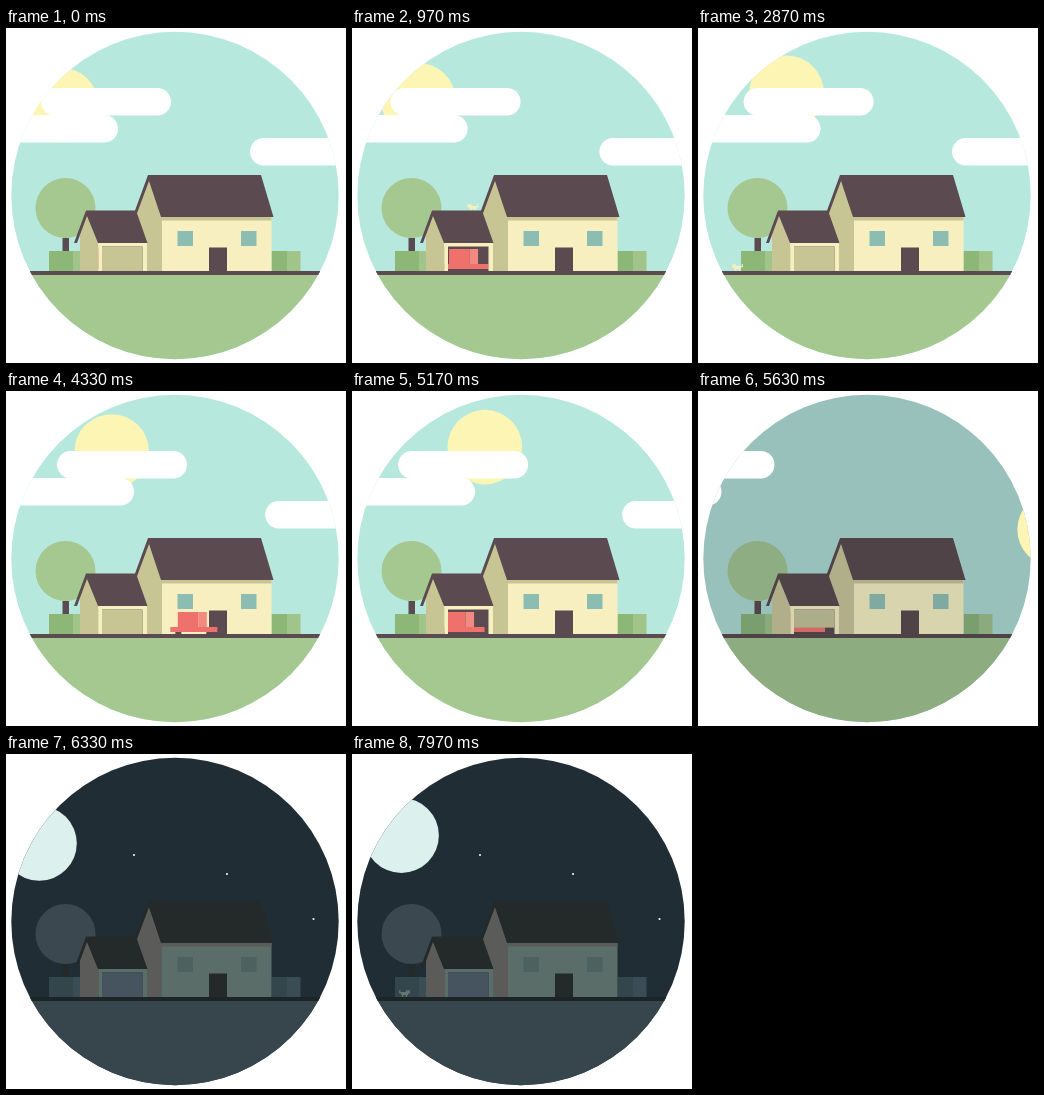
Animation of 340x335 px, one loop 8 s. Source, as an HTML page with a canvas:

```html
<!DOCTYPE html>
<html lang="en">
<head>
<meta charset="utf-8">
<title>House, day to night</title>
<style>
  html, body { margin: 0; width: 100%; height: 100%; overflow: hidden; background: #fff; }
  canvas { display: block; width: 340px; height: 335px; }
</style>
</head>
<body>
<canvas id="stage"></canvas>
<script>
const LOOP = 8000;
const GROUND = 243;
const canvas = document.getElementById('stage');
const ctx = canvas.getContext('2d');
const ratio = window.devicePixelRatio || 1;
canvas.width = 340 * ratio;
canvas.height = 335 * ratio;

// Each colour as [day, night].
const palette = {
  sky: ['#b7e8de', '#212d35'],
  ground: ['#a4c88f', '#37464d'],
  line: ['#5b4a50', '#1d2425'],
  roof: ['#5b4a50', '#242a29'],
  wall: ['#f7efc0', '#5b6d69'],
  side: ['#c8c595', '#5b5c5a'],
  shutter: ['#c8c595', '#46545f'],
  glass: ['#8bbdb2', '#4d615f'],
  tree: ['#a4c88f', '#3c484f'],
  bushDark: ['#8cb777', '#33464c'],
  bushLight: ['#a0c48a', '#3a4d55'],
  car: ['#ee716b', '#6b4a4a'],
  carLight: ['#f28a82', '#75524f'],
  cat: ['#f7efc0', '#647775']
};

const clamp = v => Math.min(1, Math.max(0, v));
const progress = (t, from, to) => clamp((t - from) / (to - from));
const mix = (a, b, p) => a + (b - a) * p;
const channels = hex => [1, 3, 5].map(i => parseInt(hex.slice(i, i + 2), 16));

let night = 0;
function shade(name) {
  const [day, dark] = palette[name].map(channels);
  return `rgb(${day.map((v, i) => Math.round(mix(v, dark[i], night)))})`;
}

function rect(fill, x, y, right, bottom) {
  ctx.fillStyle = fill;
  ctx.fillRect(x, y, right - x, bottom - y);
}

function disc(fill, x, y, r) {
  ctx.fillStyle = fill;
  ctx.beginPath();
  ctx.arc(x, y, r, 0, Math.PI * 2);
  ctx.fill();
}

function poly(fill, ...xy) {
  ctx.fillStyle = fill;
  ctx.beginPath();
  for (let i = 0; i < xy.length; i += 2) ctx.lineTo(xy[i], xy[i + 1]);
  ctx.fill();
}

function cloud(left, right, y) {
  ctx.fillStyle = '#fff';
  ctx.beginPath();
  ctx.roundRect(left, y, right - left, 27.5, 13.7);
  ctx.fill();
}

const orbitY = x => 54.8 + 0.00211 * (x - 157.5) ** 2;

function drawSky(t) {
  rect(shade('sky'), 0, 0, 340, 335);

  ctx.globalAlpha = progress(t, 5900, 6320);
  for (const [x, y] of [[128, 101], [221, 120], [307.5, 165]]) disc('#eef6f5', x, y, 1.1);
  ctx.globalAlpha = 1;

  const rush = Math.max(0, t - 5000) / 630;
  const drift = 0.0037 * t;
  const sunX = 55 + 0.0117 * t + 235 * rush ** 2;
  if (sunX < 400) disc('#fdf5b4', sunX, orbitY(sunX), 37.3);

  if (t > 5700) {
    const rise = 1 - (1 - progress(t, 5700, 6300)) ** 2;
    const moonX = mix(-60, 33, rise) + 0.0098 * Math.max(0, t - 6300);
    disc('#dcf0ee', moonX, orbitY(moonX) + 2, 37.5);
  }

  const sweep = 109 * rush ** 2;
  cloud(35 + drift - sweep, 165 + drift - sweep, 60);
  cloud(-80, 112 + drift - sweep, 87);
  cloud(244 + 0.0035 * t + sweep, 520 + sweep, 110);
}

function drawHouse() {
  const roof = shade('roof');
  poly(shade('side'), 142, 150, 156, 189, 156, GROUND, 130, GROUND, 130, 183);
  rect(shade('wall'), 156, 187, 265.5, GROUND);
  rect(shade('side'), 156, 189, 265.5, 192.5);
  poly(roof, 142, 147, 255, 147, 267.5, 189, 155, 189, 143, 153, 130, 188, 127, 188);
  for (const x of [171.5, 235]) rect(shade('glass'), x, 203, x + 15.5, 218);
  rect(roof, 203, 219.5, 221, GROUND);
}

function carX(t) {
  if (t < 3400) {
    const s = Math.max(0, t - 750);
    const ramp = 400, speed = 0.1564;
    return 80 + speed * (s < ramp ? s * s / (2 * ramp) : s - ramp / 2);
  }
  return 324 - 244 * Math.sin(progress(t, 3400, 5450) * Math.PI / 2);
}

function drawCar(t) {
  const x = carX(t);
  if (x > 330) return;
  rect(shade('car'), x + 7.5, 221, x + 28, 237);
  rect(shade('carLight'), x + 28, 221, x + 36.5, 237);
  rect(shade('car'), x, 236, x + 47, 241);
  for (const dx of [5, 36]) rect(shade('roof'), x + dx, 241, x + dx + 6, 244);
}

function doorOpening(t) {
  return t < 3000
    ? progress(t, 300, 750) - progress(t, 1200, 1650)
    : progress(t, 4350, 4750) - progress(t, 5350, 5730);
}

function drawGarage(t) {
  const wall = shade('wall');
  poly(shade('side'), 80.5, 186, 92.5, 215, 92.5, GROUND, 74, GROUND, 74, 205);
  rect(wall, 92.5, 213, 141, 218.5);
  rect(wall, 92.5, 213, 96, GROUND);
  rect(wall, 136.5, 213, 141, GROUND);
  rect(shade('shutter'), 96, 218.5, 136.5, mix(GROUND, 218.5, doorOpening(t)));
  poly(shade('roof'), 80, 182.5, 130, 182.5, 141.5, 215, 92, 215, 81, 188, 71, 215, 68, 215);
}

function drawPlants() {
  disc(shade('tree'), 59.5, 180, 30);
  rect(shade('roof'), 56.5, 210, 63, 224);
  rect(shade('bushDark'), 43, 223, 67, GROUND);
  rect(shade('bushLight'), 67, 223, 81, GROUND);
  rect(shade('bushDark'), 265.5, 223, 281, GROUND);
  rect(shade('bushLight'), 281, 223, 294.5, GROUND);
}

function drawCat(x, y, facing, t) {
  const fill = shade('cat');
  const step = Math.sin(t / 45) * 0.7;
  ctx.save();
  ctx.translate(x + 5.5, y);
  ctx.scale(facing, 1);
  poly(fill, 1.5, -7.5, 2.5, -6.6, 4, -6.6, 5, -7.5, 5.5, -3.5, 1.5, -3.5);
  rect(fill, -3.5, -5, 3.5, -2);
  rect(fill, -5.3, -7, -4.2, -4);
  rect(fill, -5.3, -4.8, -3, -3.7);
  rect(fill, -3.3 + step, -2.2, -1.9 + step, 0);
  rect(fill, 1.8 - step, -2.2, 3.2 - step, 0);
  ctx.restore();
}

const CAT_SPEED = 0.048;
function drawDayCat(t) {
  const fall = progress(t, 1730, 2205);
  const x = 79 - CAT_SPEED * (t - 1730) + (t > 2205 ? 9.7 : 9.7 * fall);
  const y = mix(183, GROUND, fall ** 2) - 24 * fall * (1 - fall);
  drawCat(Math.min(x, 140) , y, -1, t);
}

function draw(t) {
  night = progress(t, 5450, 6320);
  ctx.setTransform(ratio, 0, 0, ratio, 0, 0);
  ctx.clearRect(0, 0, 340, 335);
  ctx.save();
  ctx.beginPath();
  ctx.arc(169, 167.5, 163.7, 0, Math.PI * 2);
  ctx.clip();

  drawSky(t);
  drawPlants();
  if (t > 450 && t <= 1730) drawDayCat(t);
  drawHouse();
  rect(shade('roof'), 96, 218, 137, GROUND);
  drawCar(t);
  drawGarage(t);
  rect(shade('ground'), 0, 246, 340, 335);
  rect(shade('line'), 0, GROUND, 340, 247);
  if (t > 1730 && t < 3370) drawDayCat(t);
  if (t > 7000) drawCat(47 + CAT_SPEED * (t - 7970), GROUND, 1, t);
  ctx.restore();
}

const start = performance.now();
function frame() {
  draw((performance.now() - start) % LOOP);
  requestAnimationFrame(frame);
}
frame();
</script>
</body>
</html>
```
